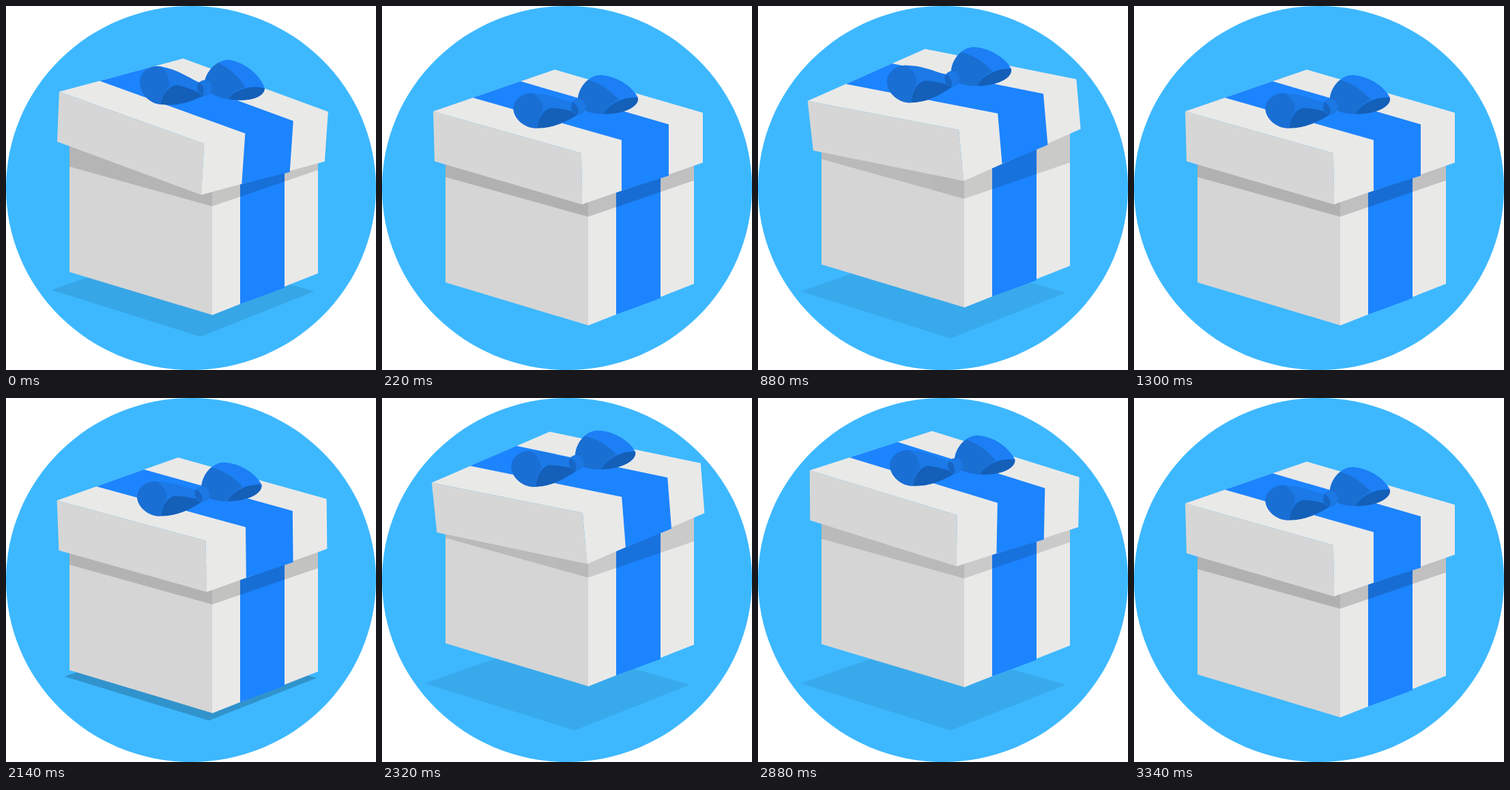
An HTML page for the animation above (3360 ms loop, 542x532 px).

```html
<!DOCTYPE html>
<html lang="en">
<head>
<meta charset="utf-8">
<title>Hopping gift box</title>
<style>
  html, body { margin: 0; width: 100%; height: 100%; overflow: hidden; background: #fff; }
  svg { display: block; width: 100vw; height: 100vh; }
</style>
</head>
<body>
<svg viewBox="0 0 542 532" preserveAspectRatio="none">
  <ellipse cx="271" cy="266" rx="271" ry="266" fill="#3db8ff"/>
  <polygon id="shadow"/>

  <g id="body">
    <path fill="#d5d5d5" d="M93 205 303 262V467L93 404Z"/>
    <path fill="#e9e9e8" d="M302 262 457 207V406L302 467Z"/>
    <path fill="#1c84ff" d="M343 247 408 224V427L343 451Z"/>
    <g id="shade">
      <path d="M93 205 302 262V308L93 250Z"/>
      <path d="M302 262 457 207V255L302 308Z"/>
    </g>
  </g>

  <g id="lid">
    <path fill="#e9e9e8" d="M75 154 253 93 470 156V229L293 290 292 215Z"/>
    <path fill="#d6d6d6" d="M75 154 292 215 293 290 77 227Z"/>
    <path fill="#1c84ff" d="M133 134 203 110 420 173V248L351 270V196Z"/>
  </g>

  <g id="bow">
    <g id="loop">
      <path fill="#1b79e8" d="M286 142C268 140 250 128 220 127.5C203 127 190 140 193 154C196 168 212 180 232 178C255 178 275 166 291 156Z"/>
      <path fill="#1a6fd4" d="M220 127.5C203 127 190 140 193 154C196 168 212 180 228 178.500C229 166 232 158 236 153C236 142 231 133 220 127.500Z"/>
      <path fill="#145fb8" d="M228 178.500C229 164 235 153 247 149C262 149 276 154 291 156C275 166 255 178 228 178.500Z"/>
    </g>
    <path fill="#1c7ff5" d="M288 149C281 128 299 101 320 101C345 102 368 119 375 134C377 150 345 160 320 158C306 157 296 153 288 149Z"/>
    <path fill="#1a6fd2" d="M288 149C284 128 294 114 302 108C320 113 336 124 347 137C336 142 328 150 325 158C308 158 296 153 288 149Z"/>
    <path fill="#145fb8" d="M325 158C330 145 352 132 375 134C377 147 355 158 325 158Z"/>
    <ellipse cx="288" cy="147" rx="11" ry="11.500" fill="#1b78e4"/>
    <path fill="#1765c4" d="M279 140C286 144 289 151 287 158C278 156 275 147 279 140Z"/>
  </g>
</svg>
<script>
const LOOP = 3360, STEP = 20;

// lag delays tilt and bow swing within a hop; rise lifts the lid off the body
const hops = [
  { at: -491, dur: 540, lift: 46, tilt: 5.6, lag: 3, rise: 0, bow: 19, swing: 7 },
  { at: 604, dur: 550, lift: 26.2, tilt: -4.9, lag: 1, rise: 6, bow: 10, swing: 5.5 },
  { at: 2122, dur: 540, lift: 49, tilt: -4.75, lag: 1, rise: 0, bow: 14, swing: 5.5 },
  { at: 2662, dur: 540, lift: 46, tilt: 5.6, lag: 3, rise: 0, bow: 19, swing: 7 }
];
const ground = [[93, 404], [302, 467], [457, 406], [240, 355]];
const spread = [[62, 417], [282, 486], [451, 419], [234, 357]];

const [shadow, body, shade, lid, bow, loop] =
  ["shadow", "body", "shade", "lid", "bow", "loop"].map(id => document.getElementById(id));

const set = (el, value) => el.setAttribute("transform", value);
const mix = (a, b, k) => a + (b - a) * k;
const smooth = x => { x = Math.min(1, Math.max(0, x)); return x * x * (3 - 2 * x); };
const arc = u => 4 * u * (1 - u);

function pose(t) {
  const hop = hops.find(h => t >= h.at && t < h.at + h.dur);
  if (!hop) return { lift: 0, lidLift: 0, tilt: 0, bowLift: 0, swing: 0, puff: 0 };
  const u = (t - hop.at) / hop.dur;
  const wave = Math.sin(Math.PI * u ** Math.max(2, hop.lag));
  const lift = hop.lift * arc(u);
  return {
    lift,
    lidLift: lift + hop.rise * arc(u),
    tilt: hop.tilt * (hop.lag > 1 ? wave : arc(u)),
    bowLift: hop.bow * wave,
    swing: hop.swing * wave,
    puff: 0.1 * wave
  };
}

function draw(t) {
  const p = pose(t);
  const s = smooth(p.lift / 20);
  shadow.setAttribute("points", ground.map(([x, y], i) =>
    mix(x, spread[i][0], s) + "," + mix(y, spread[i][1], s)).join(" "));
  shadow.setAttribute("fill-opacity", p.lift > 0 ? 0.24 - 0.165 * s : 0);
  shade.setAttribute("opacity", 0.17 - 0.0015 * Math.min(p.lift, 30));

  const lidMove = `translate(0 ${-p.lidLift}) rotate(${p.tilt} 272 190)`;
  set(body, `translate(0 ${-p.lift})`);
  set(lid, lidMove);
  set(bow, `translate(0 ${-p.bowLift}) ${lidMove} rotate(${p.swing} 288 147)`);
  set(loop, `translate(0 ${147 * -p.puff}) scale(1 ${1 + p.puff})`);
}

const start = performance.now();
function tick() {
  const t = Math.max(0, performance.now() - start) % LOOP;
  draw(Math.floor(t / STEP) * STEP);
  requestAnimationFrame(tick);
}
tick();
</script>
</body>
</html>
```
